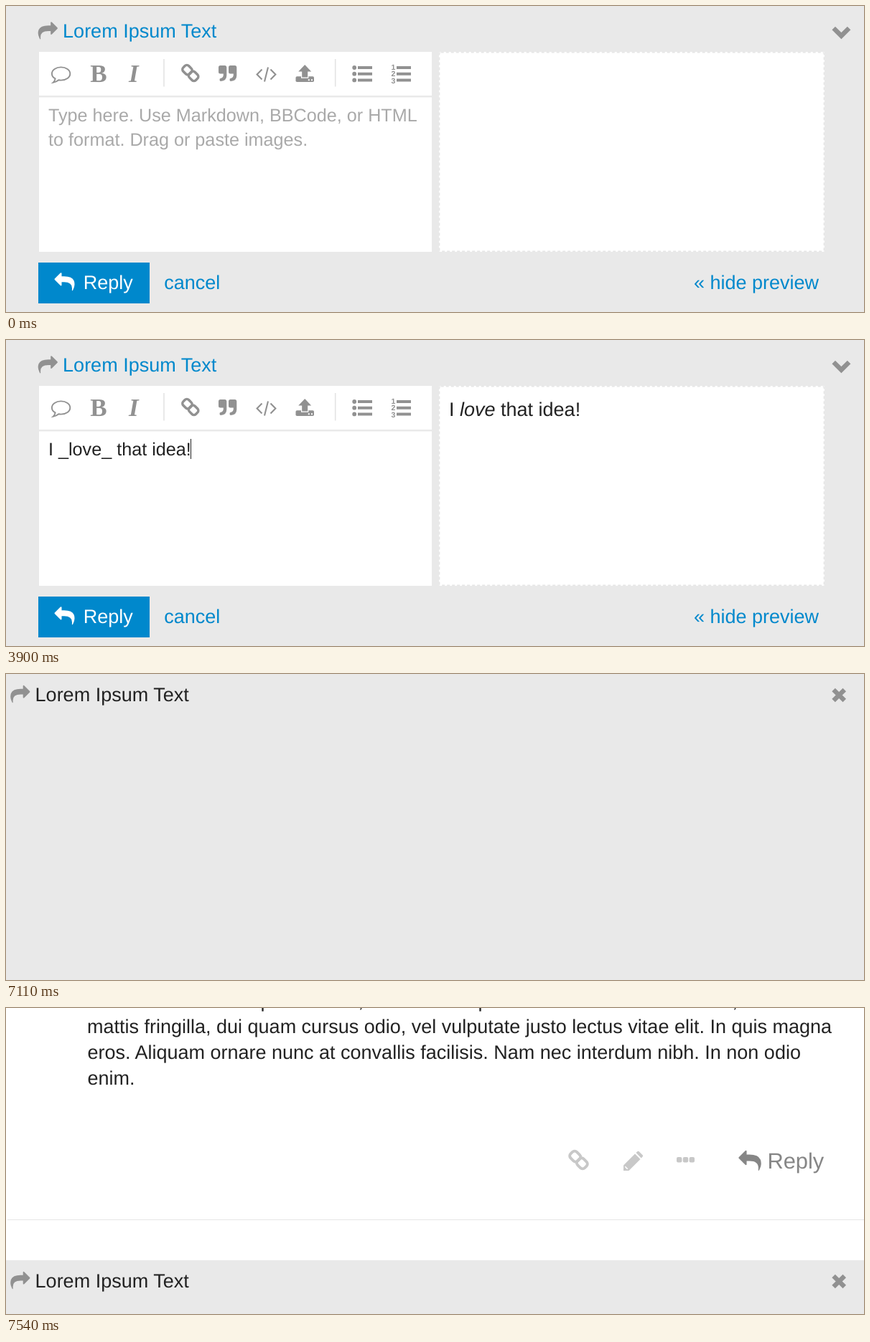
An HTML page for the animation above (8 s loop, 1195 by 427 pixels).

```html
<!DOCTYPE html>
<html lang="en">
<head>
<meta charset="utf-8">
<title>Reply composer</title>
<style>
  html, body { margin: 0; width: 100%; height: 100%; overflow: hidden; background: #fff; }
  svg { display: block; width: 1195px; height: 427px; }
  text {
    font: 27px "Liberation Sans", Arial, sans-serif;
    fill: #222; white-space: pre; text-rendering: geometricPrecision;
  }
  .edit { font-size: 25.2px; }
  .hint { fill: #a9a9a9; }
  .blue { fill: #08c; }
  .white { fill: #fff; }
  .serif { font-family: "Liberation Serif", "Times New Roman", serif; font-weight: bold; font-size: 35px; }
  .slant { font-style: italic; }
  .num { font-size: 10.5px; font-weight: bold; }
  .big { font-size: 30.86px; fill: #868686; }
  .grey, .grey text { fill: #919191; }
  .line { fill: none; stroke: #919191; }
  .pale { fill: #c8c8c8; }
</style>
</head>
<body>
<svg viewBox="0 0 1195 427">
  <defs>
    <path id="arrow" d="M27.7 9.3L19.7 1.3Q18 .2 18 2V6H14.5Q3.4 6 .8 12.3Q0 14.4 0 17.5Q0 20.1 2 24.5Q2.6 26 3.1 26Q3.7 26 3.6 25L3.5 22.6Q3.5 14 14.5 14H18V18Q18 19.8 19.7 18.7L27.7 10.7Q28.3 10 27.7 9.3Z"/>
    <g id="chain" transform="rotate(45)" fill="none" stroke-width="3.5">
      <rect x="-12.4" y="-5.4" width="12.6" height="10.8" rx="3.8"/>
      <rect x="-.2" y="-5.4" width="12.6" height="10.8" rx="3.8"/>
    </g>
    <path id="quote" d="M2.5 0H9Q11.3 0 11.3 2.5V14Q11.3 21.5 3 22Q1.6 22 1.6 20.6V19.2Q1.6 18 3 18Q6.8 17 6.8 13V11.5H2.5Q0 11.5 0 9V2.5Q0 0 2.5 0Z"/>
    <path id="bars" d="M0 86H20M0 94.7H20M0 103.4H20" stroke="#919191" stroke-width="4"/>
  </defs>

  <g id="post">
    <rect width="1195" height="427" fill="#fff"/>
    <text x="354.5" y="-1">p</text>
    <text x="490.5" y="-1">,</text>
    <text x="657.5" y="-1">p</text>
    <text x="1011.5" y="-1">,</text>
    <text x="113" y="35">mattis fringilla, dui quam cursus odio, vel vulputate justo lectus vitae elit. In quis magna</text>
    <text x="113.4" y="71">eros. Aliquam ornare nunc at convallis facilisis. Nam nec interdum nibh. In non odio</text>
    <text x="113.4" y="107">enim.</text>
    <use href="#chain" transform="translate(797.5 212) scale(1.12)" stroke="#c8c8c8"/>
    <g class="pale">
      <path d="M860 227V219.5L876 203.5L883.5 211L867.5 227Z"/>
      <path d="M877.5 202L879.3 200.3Q880.5 199.4 881.7 200.3L886.6 205.2Q887.5 206.5 886.6 207.6L884.8 209.4Z"/>
      <path d="M862.3 221.3L865.7 224.7" stroke="#fff" stroke-width="1.6"/>
      <rect x="934" y="208" width="7.4" height="7.6" rx="2"/>
      <rect x="942.8" y="208" width="7.4" height="7.6" rx="2"/>
      <rect x="951.6" y="208" width="7.4" height="7.6" rx="2"/>
    </g>
    <use href="#arrow" transform="translate(1051.8 197.8) scale(-1.125 1.125)" fill="#868686"/>
    <text class="big" x="1060.4" y="224">Reply</text>
    <rect x="2" y="295" width="1193" height="1" fill="#e6e6e6"/>
  </g>

  <g id="panel">
    <rect width="1195" height="440" fill="#e9e9e9"/>
    <g id="head">
      <use href="#arrow" transform="translate(6.2 15) scale(.972)" class="grey"/>
      <text id="title" x="40.6" y="37.7">Lorem Ipsum Text</text>
    </g>
    <path id="close" class="line" stroke-width="6.4" d="M1152.6 21.9L1167.8 37.1M1167.8 21.9L1152.6 37.1"/>
  </g>

  <g id="composer">
    <path class="line" stroke-width="6.5" d="M1152.7 31L1163.4 41.6L1174.1 31"/>
    <path class="white" d="M46 64H593V125H46ZM46 127.5H593V343H46Z"/>
    <rect class="white" x="603" y="64" width="537" height="279" rx="2"/>
    <rect x="603.7" y="64.7" width="535.6" height="277.6" rx="2" fill="none" stroke="#e6e6e6" stroke-width="1.4" stroke-dasharray="4 3"/>

    <path class="line" stroke-width="1.9" d="M68.6 101.4C65 99.5 63.9 97 63.9 94.5C63.9 89.4 69.6 85.4 76.6 85.4S89.3 89.4 89.3 94.5S83.6 103.6 76.6 103.6Q75 103.6 73.3 103.3Q70 106.2 65.6 106.9Q68.2 104.6 68.6 101.4Z"/>
    <text class="serif grey" x="117.3" y="106">B</text>
    <text class="serif slant grey" x="171" y="106">I</text>
    <path d="M220 74V112.5M458.7 74V112.5" stroke="#e4e4e4" stroke-width="1.6"/>
    <use href="#chain" transform="translate(256.8 93.5)" stroke="#919191"/>
    <g class="grey">
      <use href="#quote" x="296" y="83"/>
      <use href="#quote" x="310" y="83"/>
    </g>
    <path class="line" stroke-width="2.1" d="M356.5 88.5L349.6 95.5L356.5 102.5M365 85.5L360 105.5M368.5 88.5L375.4 95.5L368.5 102.5"/>
    <g class="grey">
      <rect x="403.5" y="98.3" width="25.5" height="7.7" rx="1.8"/>
      <path d="M416.2 82L425.2 91.4H420.2V99.5H412.2V91.4H407.2Z" stroke="#fff" stroke-width="2.4" paint-order="stroke"/>
      <path class="white" d="M420.8 102.3h2v2h-2zM425 102.3h2v2h-2z"/>
      <circle cx="485.2" cy="86" r="2.9"/>
      <circle cx="485.2" cy="94.7" r="2.9"/>
      <circle cx="485.2" cy="103.4" r="2.9"/>
      <text class="num" x="536.6" y="88.5">1</text>
      <text class="num" x="536.6" y="98.2">2</text>
      <text class="num" x="536.6" y="108">3</text>
    </g>
    <use href="#bars" x="490"/>
    <use href="#bars" x="544"/>

    <g id="hint">
      <text class="edit hint" x="59" y="161">Type here. Use Markdown, BBCode, or HTML</text>
      <text class="edit hint" x="59" y="195">to format. Drag or paste images.</text>
    </g>
    <text id="input" class="edit" x="59" y="161"></text>
    <rect id="caret" y="138" width="1" height="28" fill="#222"/>
    <text x="617" y="106"><tspan id="raw"></tspan><tspan id="em" class="slant"></tspan><tspan id="rest"></tspan></text>
    <g id="wink" fill="none" stroke="#664e27" stroke-linecap="round">
      <circle cx="826.5" cy="99.3" r="18.4" fill="#ffdb5e" stroke="none"/>
      <ellipse cx="820.5" cy="99" rx="2.3" ry="2.9" fill="#664e27" stroke="none"/>
      <path stroke-width="1.8" d="M813.8 95.5Q815.5 92.3 819 92.3M829.5 91Q833 88.5 836.5 90.5"/>
      <path stroke-width="2.2" d="M829.5 99.2Q833 95.5 837.8 97.5M822 107.3Q829 110.3 834.5 104.5"/>
    </g>

    <rect class="blue" x="45" y="358" width="155" height="57"/>
    <use href="#arrow" transform="translate(95.5 371.3) scale(-1 1)" fill="#fff"/>
    <text class="white" x="107.7" y="395">Reply</text>
    <text class="blue" x="220.2" y="395">cancel</text>
    <text id="saved" class="grey" x="509.5" y="395">saved</text>
    <text class="blue" x="958" y="395">« hide preview</text>
  </g>
</svg>
<script>
const LOOP = 8000;
const TYPED = "I _love_ that idea! ;)";
const KEYS = [1730, 1790, 2020, 2180, 2250, 2320, 2470, 2710, 2710, 2850, 2920,
  2990, 3060, 3130, 3290, 3370, 3520, 3580, 3900, 4120, 4260, 4570];
const CARET_X = [59, 66, 73, 87, 92, 106, 118, 132, 146, 153, 160, 174,
  188, 195, 202, 208, 222, 236, 250, 257, 263, 271, 279];
const BLINKS = [490, 1030, 1490, 5100, 5640, 6120, 6570];
const SAVED = 6500;
// time and top edge of the closing panel
const CLOSE = [[7110, 0], [7180, 101], [7260, 245], [7320, 307], [7400, 341], [7470, 351], [7540, 352]];

const $ = id => document.getElementById(id);
const show = (id, on) => $(id).setAttribute("display", on ? "inline" : "none");
const put = (id, s) => { if ($(id).textContent !== s) $(id).textContent = s; };
const passed = (list, t) => list.filter(v => v <= t).length;
const move = (id, x, y) => $(id).setAttribute("transform", `translate(${x} ${y})`);

function preview(text) {
  const m = text.match(/^(.*?)_(\w+?)_(.*)$/);
  const [raw, em, rest] = m ? m.slice(1) : [text, "", ""];
  put("raw", raw);
  put("em", em);
  put("rest", rest.replace(";)", ""));
  show("wink", rest.endsWith(";)"));
}

function render(t) {
  const step = CLOSE.filter(s => s[0] <= t).pop();
  const open = !step;
  show("composer", open);
  show("close", !open);
  move("panel", 0, open ? 0 : step[1]);
  move("head", open ? 38.5 : 0, open ? 6.3 : 0);
  $("title").setAttribute("class", open ? "blue" : "");
  if (!open) return;

  const n = passed(KEYS, t);
  const text = TYPED.slice(0, n);
  put("input", text);
  preview(text);
  show("hint", n === 0);
  $("caret").setAttribute("x", CARET_X[n]);
  show("caret", passed(BLINKS, t) % 2 === 1);
  show("saved", t >= SAVED);
}

const start = performance.now();
function tick() {
  render((performance.now() - start) % LOOP);
  requestAnimationFrame(tick);
}
tick();
</script>
</body>
</html>
```
